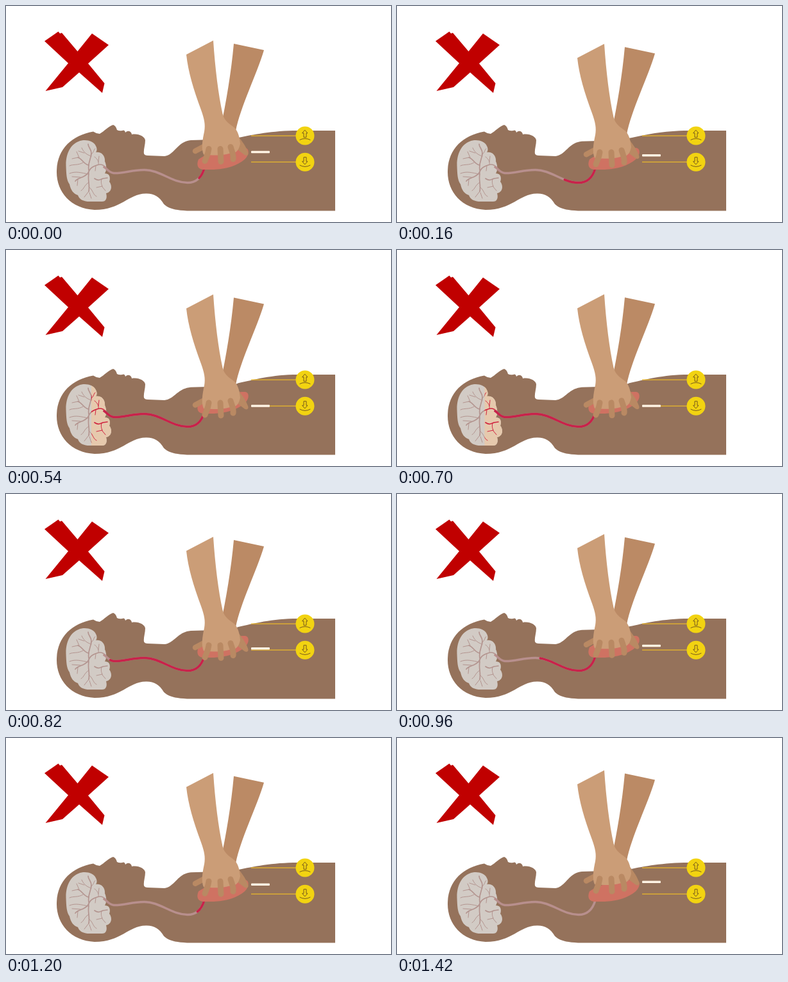
Animation of 600x338 px, one loop 1.44 s. Source, as an HTML page:

```html
<!DOCTYPE html>
<html lang="en">
<head>
<meta charset="utf-8">
<title>Chest compressions</title>
<style>
html, body { margin: 0; width: 100%; height: 100%; overflow: hidden; background: #fff; }
svg { display: block; width: 100vw; height: 100vh; }
.line { fill: none; stroke-linecap: round; stroke-linejoin: round; }
</style>
</head>
<body>
<svg viewBox="0 0 600 338">
  <defs>
    <path id="lobe" d="M93.500 250C93 232 100 217 113 212C122 208 136 210 140 219C142 223 142 226 140 229C148 227 155 234 154 243C157 250 157 257 154 262C162 262 163 269 161 275C166 281 165 291 156 293C158 300 156 306 150 306H127C119 305 114 302 112 296C105 294 101 288 99 279C94 272 94 262 93.500 250Z"/>
    <g id="veins" class="line">
      <g stroke-width="1.700">
        <path d="M155 252C149 246 144 248 139 250S131 254 128 261M129 257C127 246 132 240 133 232S128 222 128 216"/>
        <path d="M129 249C121 248 119 239 112 237M129 260C122 270 114 267 108 274M129 262C127 274 131 279 129 290M138 270C143 274 147 272 151 270L158 269"/>
      </g>
      <g stroke-width="1">
        <path d="M133 235C126 233 121 229 118 222M132 232C137 231 136 225 139 223M120 245C112 250 105 247 99 250M112 237L103 239M114 237L110 228M122 230L113 227"/>
        <path d="M128 263C117 261 109 258 99 262M116 268L103 267M112 271L111 281M129 276C122 280 122 286 117 289M129 283C136 288 135 295 141 298M129 290L122 299M130 292L133 301"/>
        <path d="M144 248C145 243 142 239 138 236M144 244L145 235M140 250L139 258M149 271C147 277 150 281 150 283L155 289M150 282L141 284"/>
      </g>
    </g>
    <clipPath id="lit"><rect id="litBox" y="200" width="100" height="115"/></clipPath>
  </defs>
  <rect width="600" height="338" fill="#fff"/>
  <path fill="#c00000" d="M60 55L81.500 40L84 43L87 42L111.500 71L134 43L160 61L128 90L153.500 121L150 136L114 104L88 127L61.500 133L97 89.500Z"/>
  <path id="body" fill="#95725b"/>
  <use href="#lobe" fill="#d2cbc5"/>
  <use href="#veins" stroke="#b3948f"/>
  <g id="glow" clip-path="url(#lit)">
    <use href="#lobe" fill="#e6c9ad"/>
    <use href="#veins" stroke="#d0233f"/>
  </g>
  <g class="line" stroke-width="3.500">
    <path id="vessel" stroke="#b88f8d"/>
    <path id="blood" stroke="#c8224a"/>
  </g>
  <path fill="#cf7262" d="M300 240C296 250 299 257 312 256C336 257 358 252 372 240C380 232 379 223 373 222C350 222 318 227 300 240Z"/>
  <g id="arms">
    <path fill="#bb8a65" d="M355 55.500L402 65.500C391 103 365 155 358 192L350 205L334 190C343 148 351 100 355 55.500Z"/>
    <path class="line" stroke="#b98963" stroke-width="8.500" d="M309 216L295 223.500"/>
    <path fill="#b98963" d="M357 195C366 205 373 214 377 225C379 230 375 232 371 229L358 219Z"/>
    <path fill="#cb9d77" d="M281 72.500L323 50.500C326 95 331 135 337.500 165C341 178 348 180 356 187C363 194 364 204 365 212C363 222 359 227 352 226C341 230 329 231 308 229C304 220 306 207 309 193C311 182 309 173 304 159C292 126 284 100 281 72.500Z"/>
    <g class="line" stroke="#b98963" stroke-width="9">
      <path d="M316 220C315 229 312 233 310 239"/>
      <path d="M334 220L335 240"/>
      <path d="M350 217C353 226 355 230 354 236"/>
    </g>
  </g>
  <path stroke="#ecb92a" stroke-width="1.200" d="M382 203.200H455M382 244.200H455"/>
  <rect id="bar" x="382" width="29" height="3.500" rx="1" fill="#fff4e4"/>
  <g id="badges"></g>
</svg>
<script>
const $ = id => document.getElementById(id);
const LOOP = 1440;
const STROKE = 19.4;
const ROUTE = 'M309 254C305 268 297 276.500 283 276.500C258 276.500 240 256 215 256.500C195 256.500 185 262 168 261.500C160 260.500 158 255 153 252';

$('vessel').setAttribute('d', ROUTE);
$('blood').setAttribute('d', ROUTE);

const badge = (y, arrow, arc) => `<g transform="translate(466 ${y})">
  <circle r="14.500" fill="#f2d311"/>
  <g class="line" stroke="#76591d" stroke-width="1"><path d="${arrow}"/><path d="${arc}"/></g></g>`;
$('badges').innerHTML =
  badge(202.9, 'M0 -8.500L4 -4H2V2.500H-2V-4H-4Z', 'M-8 6.500Q0 2.500 8 6.500') +
  badge(244.2, 'M0 3.500L4 -1H2V-7.500H-2V-1H-4Z', 'M-8 5Q0 9.500 8 5');

// The loop begins partway into the downstroke and ends near the top.
const depth = t => STROKE * (1 - Math.cos(0.88 + 0.0037 * t)) / 2;

function bodyPath(dip) {
  return `M79 260C79 225 101 203 136 196.500Q141 200 146 200C153 196 160 188 167 186Q171 187 173 194
    Q177 196 181 195Q185 193 186 198Q190 194 194 197Q196 199 196 201C206 199 216 204 217 210
    C217 218 214 225 215 231Q216 234 221 234L247 235C263 233 267 ${211 + dip} 288 ${209 + dip}
    L306 ${208.5 + dip}L350 ${208 + dip}L362 ${205.5 + dip * 0.5}
    C385 ${201 + dip * 0.4} 414 195 455 195H513V320.500H288C264 320 253 317 246 310
    C239 298 230 293 218 293.500C190 294 180 319 138 319C101 317 79 291 79 260Z`;
}

function draw(now) {
  const d = depth(now % LOOP);
  const flow = 3.5 * d + 0.375 * d * d;
  const reach = Math.max(0, flow - 171) * 0.93;
  $('body').setAttribute('d', bodyPath(d * 0.3));
  $('arms').setAttribute('transform', `translate(0 ${d})`);
  $('bar').setAttribute('y', 223.3 + d);
  $('blood').setAttribute('stroke-dasharray', `${flow} 500`);
  $('blood').style.display = d > 0.4 ? '' : 'none';
  $('litBox').setAttribute('x', 163 - reach);
  $('glow').style.display = reach ? '' : 'none';
}

function tick() {
  draw(performance.now());
  requestAnimationFrame(tick);
}
tick();
</script>
</body>
</html>
```
